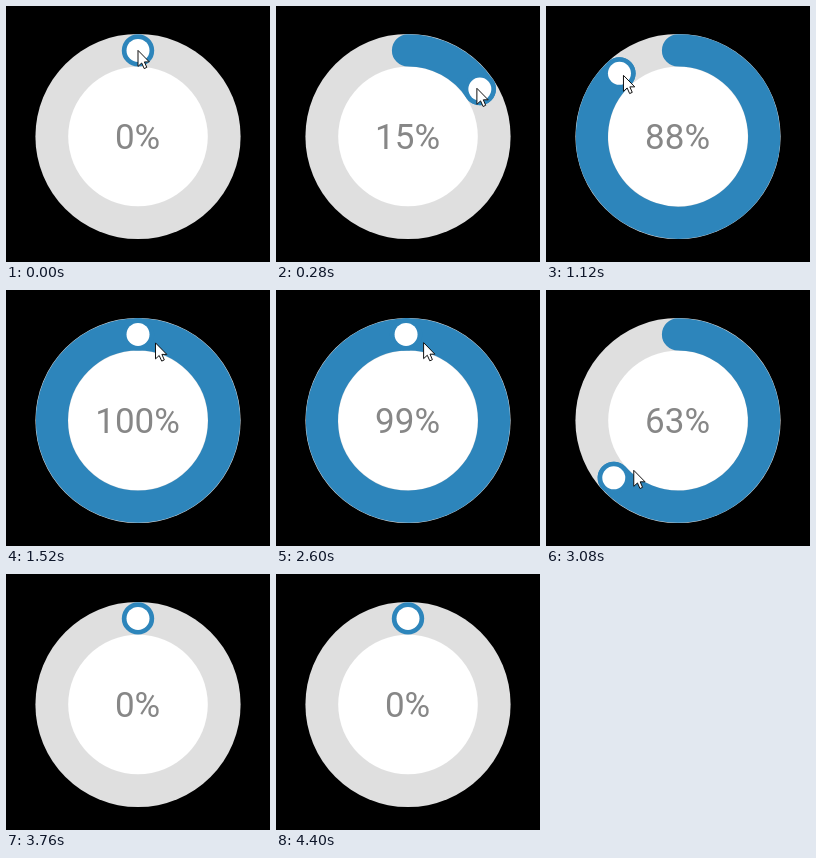
An HTML page for the animation above (4440 ms loop, 264 px wide and 256 px high).

```html
<!DOCTYPE html>
<html lang="en">
<head>
<meta charset="utf-8">
<title>Circular slider</title>
<style>
  html, body { margin: 0; width: 100%; height: 100%; overflow: hidden; background: #000; }
  svg { display: block; width: 100vw; height: 100vh; }
  text { font: 400 35px Roboto, Arial, sans-serif; fill: #878787; text-anchor: middle; }
</style>
</head>
<body>
<svg viewBox="0 0 264 256">
  <circle cx="132" cy="130.5" r="102.6" fill="#dfdfdf"/>
  <circle cx="132" cy="130.5" r="69.8" fill="#fff"/>
  <path id="arc" fill="none" stroke="#2d85bb" stroke-width="32.2" stroke-linecap="round"/>
  <g id="knob">
    <circle r="16.2" fill="#2d85bb"/>
    <circle r="11.5" fill="#fff"/>
  </g>
  <text id="label" x="131.6" y="143"></text>
  <path id="cursor" d="M0 0V16L3.7 12.6 6.2 18.2 8.8 17 6.4 11.5H11.3Z"
        fill="#fff" stroke="#111" stroke-linejoin="round"/>
</svg>
<script>
const LOOP = 4440, STEP = 40, CX = 132, CY = 130.5, R = 86.1;
const CURSOR_GONE = 3760;
const [arc, knob, label, cursor] =
  ['arc', 'knob', 'label', 'cursor'].map(id => document.getElementById(id));

// Drag poses; dx and dy place the pointer relative to the knob
const poses = [
  { t: 0, value: 0, dx: 0, dy: 0 },
  { t: 680, value: 56.7, dx: -8, dy: -2 },
  { t: 1120, value: 88.1, dx: 4, dy: 2 },
  { t: 1520, value: 100, dx: 17.5, dy: 8.5 },
  { t: 2560, value: 100, dx: 17.5, dy: 8.5 },
  { t: 3080, value: 63.4, dx: 20, dy: -7.5 },
  { t: 3360, value: 27.7, dx: -13, dy: 12 },
  { t: 3680, value: 0, dx: 0, dy: -5 },
  { t: LOOP, value: 0, dx: 0, dy: -5 }
];

const slope = (a, b, key) => (b[key] - a[key]) / (b.t - a.t);

// Harmonic mean of the neighbouring slopes, flat at turning points
function tangent(i, key) {
  if (i === 0 || i === poses.length - 1) return 0;
  const a = slope(poses[i - 1], poses[i], key);
  const b = slope(poses[i], poses[i + 1], key);
  return a * b > 0 ? 2 * a * b / (a + b) : 0;
}

function sample(key, t) {
  const i = Math.max(1, poses.findIndex(p => p.t >= t));
  const a = poses[i - 1], b = poses[i];
  const d = b.t - a.t, u = (t - a.t) / d, w = 1 - u;
  return a[key] * (1 + 2 * u) * w * w + b[key] * u * u * (3 - 2 * u)
    + d * u * w * (tangent(i - 1, key) * w - tangent(i, key) * u);
}

function onRing(percent) {
  const a = percent * Math.PI / 50;
  return [CX + R * Math.sin(a), CY - R * Math.cos(a)];
}

function arcPath(percent) {
  if (percent <= 0) return '';
  const part = p => `A${R} ${R} 0 0 1 ${onRing(p)}`;
  return `M${onRing(0)}${part(percent / 2)}${part(percent)}`;
}

const place = (el, x, y) => el.setAttribute('transform', `translate(${x} ${y})`);

function draw(ms) {
  const t = Math.floor(ms % LOOP / STEP) * STEP;
  const value = sample('value', t);
  const [x, y] = onRing(value);
  arc.setAttribute('d', arcPath(value));
  place(knob, x, y);
  place(cursor, x + sample('dx', t), y + sample('dy', t));
  cursor.style.display = t < CURSOR_GONE ? '' : 'none';
  label.textContent = Math.round(value - 0.3) + '%';
}

const start = performance.now();
function tick() {
  draw(performance.now() - start);
  requestAnimationFrame(tick);
}
tick();
</script>
</body>
</html>
```
